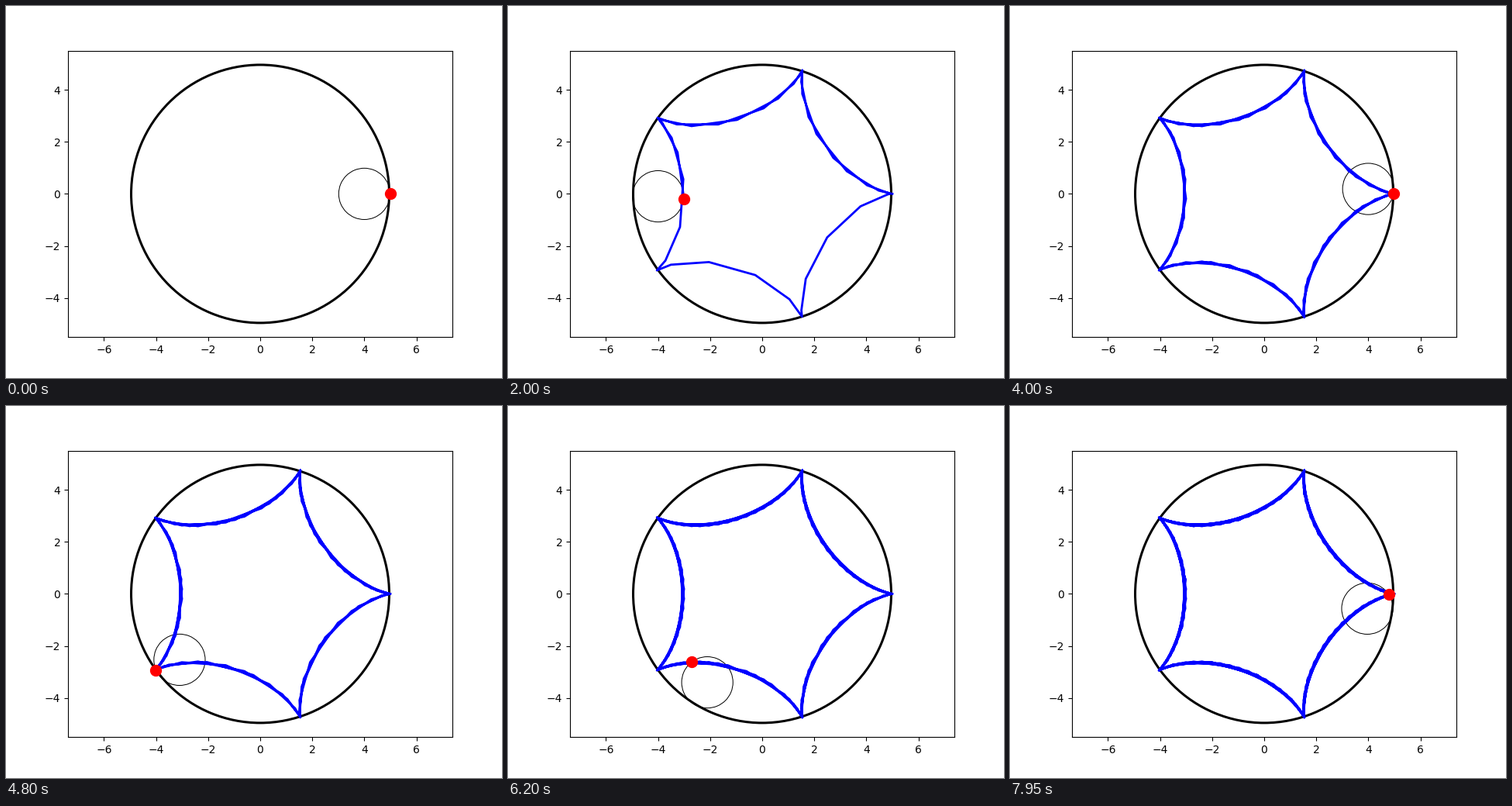
These frames come from a looping animation (640 px wide and 480 px high, 8000 ms). A matplotlib script:

```python
import numpy as np
import matplotlib.pyplot as plt
from matplotlib.animation import FuncAnimation
from matplotlib.patches import Annulus

R, r = 5, 1
FRAMES, INTERVAL = 160, 50
STEP = 30 * np.pi / 399

t = np.arange(FRAMES) * STEP
cx, cy = (R - r) * np.cos(t), (R - r) * np.sin(t)
x = cx + r * np.cos((R - r) / r * t)
y = cy - r * np.sin((R - r) / r * t)

fig, ax = plt.subplots(figsize=(6.4, 4.8), dpi=100)
ax.set_aspect("equal", adjustable="datalim")
ax.set_xlim(-5.5 * 496 / 369.6, 5.5 * 496 / 369.6)
ax.set_ylim(-5.5, 5.5)

ax.add_patch(Annulus((0, 0), R, 0.09, facecolor="black"))
wheel = ax.add_patch(Annulus((R - r, 0), r, 0.03, facecolor="black"))
trace, = ax.plot([], [], "b-", lw=2)
dot, = ax.plot([], [], "ro", ms=10)


def update(i):
    wheel.center = cx[i], cy[i]
    trace.set_data(x[:i + 1], y[:i + 1])
    dot.set_data([x[i]], [y[i]])
    return wheel, trace, dot


anim = FuncAnimation(fig, update, frames=FRAMES, interval=INTERVAL,
                     init_func=lambda: update(0), repeat=True, repeat_delay=0)
plt.show()
```
